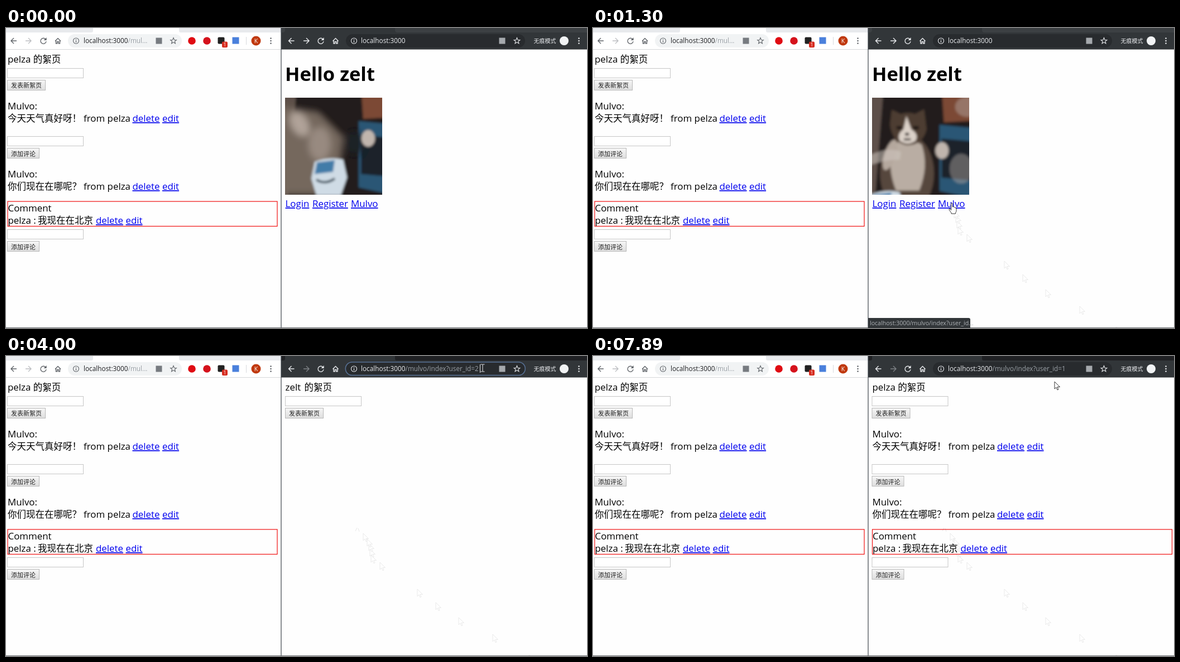
Recreate the animation shown at these times as an HTML page. Size 1041x538 px, loop 8 s.

```html
<!DOCTYPE html>
<html lang="zh-CN">
<head>
<meta charset="utf-8">
<title>Two browser windows</title>
<style>
html, body { margin: 0; width: 100%; height: 100%; overflow: hidden; background: #fff; }
svg { display: block; width: 100vw; height: 100vh; }
text { font: 16.9px "Open Sans", "Noto Sans CJK SC", "Noto Sans CJK", sans-serif; white-space: pre; }
.cjk { font-size: 16.5px; }
.btn { font-size: 11px; fill: #222; }
.link { fill: #00e; text-decoration: underline; text-decoration-thickness: 1px; }
.h1 { font-size: 34.5px; font-weight: 700; }
.url { font-size: 11.8px; fill: #9aa0a6; }
.host { fill: #e8eaed; }
.strong { font-weight: 600; }
.light { color: #5f6368; }
.dark { color: #e8eaed; }
.ico { fill: none; stroke: currentColor; stroke-width: 1.4; }
.field { fill: #fff; stroke: #c6c6c6; }
.button { fill: url(#face); stroke: #b8b8b8; }
.box { fill: none; stroke: #f01010; stroke-width: 1.2; }

/* .w parts are shown only inside their time window */
.w, .move, .photo * { animation: 8s step-end infinite; }
.w { visibility: hidden; }
@keyframes idle { 0% { visibility: visible } 20% { visibility: hidden } }
@keyframes home { 0% { visibility: visible } 23.125% { visibility: hidden } }
@keyframes gone { 23.125% { visibility: visible } }
@keyframes ready { 0% { visibility: visible } 20% { visibility: hidden } 24.125% { visibility: visible } }
@keyframes busy { 20% { visibility: visible } 24.125% { visibility: hidden } }
@keyframes status { 14.375% { visibility: visible } 25.875% { visibility: hidden } }
@keyframes blank { 23.125% { visibility: visible } 89.875% { visibility: hidden } }
@keyframes second { 23.125% { visibility: visible } 59.75% { visibility: hidden } }
@keyframes posts { 89.875% { visibility: visible } }
@keyframes ring { 36.5% { visibility: visible } 59.75% { visibility: hidden } }
@keyframes select { 36.5% { visibility: visible } 50% { visibility: hidden } }
@keyframes caret { 50% { visibility: visible } 56.875% { visibility: hidden } }
@keyframes longlist { 59.75% { visibility: visible } 63.625% { visibility: hidden } }
@keyframes shortlist { 63.625% { visibility: visible } 89.875% { visibility: hidden } }
@keyframes blink {
  63.625% { visibility: visible } 70.5% { visibility: hidden }
  76.25% { visibility: visible } 83.125% { visibility: hidden }
}
@keyframes trail1 { 10.375% { visibility: visible } }
@keyframes trail2 { 14% { visibility: visible } }
@keyframes trail3 { 27.6% { visibility: visible } }
@keyframes arrow {
  4.625% { visibility: visible } 14% { visibility: hidden }
  25.875% { visibility: visible } 32.6% { visibility: hidden }
  97.5% { visibility: visible }
}
@keyframes hand { 14% { visibility: visible } 25.875% { visibility: hidden } }
@keyframes beam { 32.6% { visibility: visible } 97.5% { visibility: hidden } }
@keyframes arrowMove {
  0%, 4.625% { transform: translate(937px, 535px) }
  5.6% { transform: translate(872px, 499px) }
  6.6% { transform: translate(811px, 469px) }
  7.5% { transform: translate(770px, 442px) }
  8.5% { transform: translate(737px, 418px) }
  9.4% { transform: translate(670px, 370px) }
  10.375% { transform: translate(654px, 357px) }
  11.5% { transform: translate(651px, 335px) }
  12.4% { transform: translate(648px, 328px) }
  13.25% { transform: translate(645px, 320px) }
  25.875% { transform: translate(640px, 318px) }
  26.75% { transform: translate(627px, 307px) }
  27.6% { transform: translate(640px, 285px) }
  28.4% { transform: translate(672px, 240px) }
  29.2% { transform: translate(715px, 180px) }
  30.1% { transform: translate(765px, 120px) }
  31% { transform: translate(815px, 70px) }
  31.8% { transform: translate(848px, 40px) }
  97.5% { transform: translate(837px, 40px) }
  98.625% { transform: translate(827px, 46px) }
}
@keyframes beamMove {
  0%, 32.6% { transform: translate(875px, 24px) }
  33.5% { transform: translate(862px, 22px) }
  34.375% { transform: translate(852.5px, 21px) }
  40.25% { transform: translate(854px, 21.5px) }
  63.625% { transform: translate(855px, 21.5px) }
}

/* photo: blurred turn, facing forward, standing back */
.photo * { animation-timing-function: steps(11); }
.photo .turn { animation-name: turn; }
.photo .cat { animation-name: cat; transform-origin: 555px 230px; }
.photo .reach { animation-name: reach; }
.photo .shelf { animation-name: shelf; }
.photo .kit { animation-name: kit; }
.photo .toy { animation-name: toy; }
.photo .paw { animation-name: paw; }
@keyframes turn { 0% { opacity: 1 } 11.5%, 100% { opacity: 0 } }
@keyframes cat {
  0% { opacity: 0; transform: translate(-16px, 12px) scale(1.18) }
  11.5% { opacity: 1; transform: translate(16px, 12px) scale(1.18) }
  21.1%, 100% { opacity: 1; transform: none }
}
@keyframes reach { 0% { opacity: 0 } 11.5% { opacity: 1 } 21.1%, 100% { opacity: 0 } }
@keyframes shelf { 0%, 11.5% { transform: translate(25px, -14px) } 21.1%, 100% { transform: none } }
@keyframes kit { 0%, 11.5% { opacity: 0 } 21.1%, 100% { opacity: 1 } }
@keyframes toy {
  0% { transform: none } 11.5% { transform: translate(-33px, 32px) }
  21.1%, 100% { transform: translate(-80px, 90px) }
}
@keyframes paw { 0%, 11.5% { transform: none } 21.1%, 100% { transform: translate(-52px, 48px) } }
</style>
</head>
<body>
<svg viewBox="0 0 1041 538" preserveAspectRatio="none">
<defs>
  <linearGradient id="face" x2="0" y2="1"><stop stop-color="#f6f6f6"/><stop offset="1" stop-color="#dedede"/></linearGradient>
  <filter id="soft"><feGaussianBlur stdDeviation="2"/></filter>
  <filter id="blur"><feGaussianBlur stdDeviation="6"/></filter>
  <filter id="shade" x="-10%" y="-10%" width="120%" height="130%"><feDropShadow dy="4" stdDeviation="4" flood-opacity=".4"/></filter>
  <clipPath id="frame"><path d="M500.3 125H674V299H500.3z"/></clipPath>

  <path id="back" class="ico" d="M5 0H-5M0-5L-5 0L0 5"/>
  <g id="reload"><path class="ico" d="M3.8-3A5 5 0 1 0 5 1"/><path fill="currentColor" d="M5.6-6V-1H.6z"/></g>
  <path id="stop" class="ico" d="M-4.5-4.5L4.5 4.5M4.5-4.5L-4.5 4.5"/>
  <path id="house" class="ico" d="M-5 .5L0-4.5L5 .5M-3.5-.5V4.8H-1.2V1.5H1.2V4.8H3.5V-.5"/>
  <path id="star" class="ico" style="stroke-width:1.1" d="M0-5.5L1.5-1.8L5.4-1.6L2.4 .9L3.4 4.7L0 2.6L-3.4 4.7L-2.4 .9L-5.4-1.6L-1.5-1.8z"/>
  <g id="info"><circle class="ico" style="stroke-width:1.1" r="5"/><path class="ico" style="stroke-width:1.2" d="M0-3V-1.6M0-.5V3"/></g>
  <g id="dots" fill="currentColor"><circle cy="-4.5" r="1.3"/><circle r="1.3"/><circle cy="4.5" r="1.3"/></g>
  <g id="globe"><circle r="5.5" fill="#c6c9cc"/><path d="M-5-1Q-1 0-2 2T0 5M1-5Q0-2 2-1T5 1" fill="none" stroke="#4a4d51" stroke-width="1.3"/></g>
  <path id="lens" class="ico" d="M1.5-1A3.2 3.2 0 1 1-4.9-1A3.2 3.2 0 1 1 1.5-1M.8 1.3L4.8 5.2"/>

  <path id="pointer" d="M0 0V13L3 10.2L5 14.8L7 14L5 9.5H9.5z" fill="#fff" stroke="#222" stroke-width=".9"/>
  <path id="finger" d="M-1.3 1Q-1.3-.5 0-.5T1.3 1V6.5L2.5 6Q4 6 4.2 7Q6 6.5 6.3 8Q8 8 8 9.5V13Q8 15 6.5 17V18.5H-1V17L-5 11.5Q-5.5 9.5-4 9.5L-1.3 12z" fill="#fff" stroke="#222" stroke-width=".9"/>

  <g id="compose">
    <rect class="field" x="2.5" y="72.5" width="136" height="17"/>
    <rect class="button" x="2.5" y="93.5" width="68" height="18"/>
    <text class="btn" x="9" y="107">发表新絮页</text>
  </g>
  <g id="reply">
    <rect class="field" x="2.5" y="194.5" width="136" height="17"/>
    <rect class="button" x="2.5" y="215.5" width="57" height="18"/>
    <text class="btn" x="9" y="229.5">添加评论</text>
  </g>
  <g id="byline">
    <text x="3" y="146">Mulvo:</text>
    <text x="139" y="168">from pelza</text>
    <text class="link" x="226.5" y="168">delete</text>
    <text class="link" x="280" y="168">edit</text>
  </g>
  <g id="feed">
    <text x="3" y="62">pelza <tspan class="cjk">的絮页</tspan></text>
    <use href="#compose"/>
    <use href="#byline"/>
    <text class="cjk" x="3" y="168">今天天气真好呀！</text>
    <use href="#reply"/>
    <use href="#byline" y="122"/>
    <text class="cjk" x="3" y="290">你们现在在哪呢？</text>
    <text x="3.5" y="329">Comment</text>
    <text x="3.5" y="351">pelza : <tspan class="cjk" x="57">我现在在北京</tspan></text>
    <text class="link" x="161" y="351">delete</text>
    <text class="link" x="214.5" y="351">edit</text>
    <use href="#reply" y="167"/>
  </g>
</defs>

<rect width="1041" height="538" fill="#fefefe"/>

<!-- left window -->
<g class="light">
  <path d="M0 0H492V38H0z" fill="#fff"/>
  <path d="M0 0H156V5Q156 8 153 8H0zM310 0H493V8H313Q310 8 310 5z" fill="#e8eaed"/>
  <path d="M0 38.5H493" stroke="#d6d8da"/>
  <use href="#back" x="14" y="23"/>
  <use href="#back" transform="translate(40 23) scale(-1 1)" color="#bdbfc2"/>
  <use href="#reload" x="67" y="23"/>
  <use href="#house" x="93" y="23"/>
  <rect x="111" y="11" width="204" height="24" rx="12" fill="#f1f3f4"/>
  <use href="#info" x="125.5" y="23"/>
  <text class="url" x="139" y="27"><tspan fill="#202124">localhost:3000</tspan>/mul...</text>
  <rect x="268.5" y="17.5" width="11" height="11" fill="#777b80"/>
  <use href="#star" x="300" y="23"/>
  <circle cx="333" cy="23" r="6.8" fill="#e00b12"/>
  <circle cx="360" cy="23" r="6.8" fill="#d5121c"/>
  <rect x="379.5" y="16.5" width="12" height="12" rx="2" fill="#222"/>
  <rect x="387" y="24.5" width="10" height="10.5" rx="2" fill="#d62d20"/>
  <text x="392" y="33" text-anchor="middle" fill="#fff" style="font-size:8.5px">1</text>
  <rect x="405.5" y="16.5" width="12" height="12" fill="#4a80dc"/>
  <path d="M430.5 16V30" stroke="#d8dadd"/>
  <circle cx="448" cy="23" r="8.5" fill="#c0390f"/>
  <text x="448" y="26.8" text-anchor="middle" fill="#fff" style="font-size:10.5px">K</text>
  <use href="#dots" x="474.5" y="23"/>
</g>
<use href="#feed"/>
<rect class="box" x="3" y="311" width="483" height="44.5"/>

<!-- right window: pages -->
<g class="w" style="animation-name:home">
  <text class="h1" x="500" y="95">Hello zelt</text>
  <g clip-path="url(#frame)"><g class="photo" filter="url(#soft)">
    <path d="M490 115H684V309H490z" fill="#211b1b"/>
    <path d="M490 115H520L505 309H490z" fill="#5d5049"/>
    <g class="shelf">
      <path d="M611 115H700V172L615 177z" fill="#7c4935"/>
      <path d="M607 181L700 190V320L607 300z" fill="#2b5675"/>
      <path d="M611 206L700 214V284L611 276z" fill="#1a222b"/>
      <g class="kit" fill="#b5aba5"><ellipse cx="657" cy="149" rx="22" ry="18"/><ellipse cx="646" cy="260" rx="21" ry="27"/></g>
    </g>
    <g class="turn" filter="url(#blur)">
      <path d="M490 140L560 150L605 195L600 240L560 300H490z" fill="#75675d"/>
      <ellipse cx="526" cy="172" rx="15" ry="24" fill="#b0a399" transform="rotate(-30 526 172)"/>
      <ellipse cx="562" cy="208" rx="20" ry="30" fill="#988a80"/>
      <ellipse cx="624" cy="206" rx="15" ry="20" fill="#1e2128"/>
    </g>
    <g class="cat">
      <ellipse cx="554" cy="252" rx="44" ry="64" fill="#56463c"/>
      <path d="M532 205Q554 190 578 205Q590 240 574 280H536Q520 240 532 205z" fill="#b9ada3"/>
      <ellipse cx="526" cy="222" rx="9" ry="26" fill="#b5a89e" transform="rotate(18 526 222)"/>
      <path d="M526 172L529 148L544 155Q556 151 567 155L582 147L586 180Q580 205 555 206Q530 203 526 172z" fill="#4d3c32"/>
      <path d="M553 158L561 180Q574 188 568 199Q555 208 542 199Q537 188 548 180z" fill="#dcd2c9"/>
      <path d="M537 175h9v5h-9zM564 175h9v5h-9zM551 186h6v4h-6zM549 195h11v3h-11z" fill="#1d1512"/>
    </g>
    <path class="reach" d="M496 228Q530 212 552 222L550 236Q525 236 496 246z" fill="#d0c7c0"/>
    <ellipse class="paw" cx="649" cy="198" rx="12" ry="15" fill="#c0b5ad"/>
    <g class="toy">
      <path d="M553 240Q578 230 604 236L611 268L600 300H556L547 270z" fill="#cfdbe5"/>
      <path d="M557 241L589 237L586 258L553 262z" fill="#437ba8"/>
      <path d="M556 272Q572 282 589 270" fill="none" stroke="#394b5a" stroke-width="4"/>
    </g>
  </g></g>
  <text class="link" x="500.5" y="321">Login</text>
  <text class="link" x="549" y="321">Register</text>
  <text class="link" x="618" y="321">Mulvo</text>
</g>
<g class="w" style="animation-name:blank">
  <text x="500.5" y="62">zelt <tspan class="cjk" x="534.5">的絮页</tspan></text>
  <use href="#compose" x="498"/>
</g>
<g class="w" style="animation-name:posts">
  <use href="#feed" x="497.5"/>
  <rect class="box" x="500.5" y="311" width="537" height="44.5"/>
</g>

<!-- faint marks left by the pointer -->
<g opacity=".1">
  <g class="w" style="animation-name:trail1">
    <use href="#pointer" x="937" y="535"/><use href="#pointer" x="872" y="499"/>
    <use href="#pointer" x="811" y="469"/><use href="#pointer" x="770" y="442"/>
    <use href="#pointer" x="737" y="418"/><use href="#pointer" x="670" y="370"/>
    <use href="#pointer" x="654" y="357"/>
  </g>
  <g class="w" style="animation-name:trail2">
    <use href="#pointer" x="652" y="346"/><use href="#pointer" x="650" y="336"/><use href="#pointer" x="647" y="328"/>
  </g>
  <g class="w" style="animation-name:trail3">
    <use href="#pointer" x="640" y="318"/><path d="M626 314L629 308M631 309L633 315" stroke="#222"/>
  </g>
</g>

<!-- right window: toolbar -->
<g class="dark">
  <path d="M493 0H1041V38.5H493z" fill="#323639"/>
  <path d="M493 0H500V5Q500 8 497 8H493zM697 0H1041V8H700Q697 8 697 5z" fill="#202124"/>
  <path class="w" style="animation-name:idle" d="M493 0H500V5Q500 8 497 8H493zM697 0H1041V8H700Q697 8 697 5z" fill="#3c4043"/>
  <use href="#back" x="511.5" y="23"/>
  <g class="w" style="animation-name:home"><use href="#back" transform="translate(538 23) scale(-1 1)"/></g>
  <g class="w" style="animation-name:gone" color="#7d8185"><use href="#back" transform="translate(538 23) scale(-1 1)"/></g>
  <g class="w" style="animation-name:ready"><use href="#reload" x="564" y="23"/></g>
  <g class="w" style="animation-name:busy"><use href="#stop" x="564" y="23"/></g>
  <use href="#house" x="590.5" y="23"/>
  <rect x="609" y="11" width="321" height="24" rx="12" fill="#282b2e"/>
  <rect class="w" style="animation-name:ring" x="608.3" y="11" width="322" height="23.5" rx="11.7" fill="none" stroke="#566f92" stroke-width="1.6"/>
  <rect class="w" style="animation-name:select" x="636" y="15" width="213" height="15" fill="#4b78b8"/>
  <use href="#info" x="623.5" y="23"/>
  <text class="url w" style="animation-name:home" x="636" y="27"><tspan class="host">localhost:3000</tspan></text>
  <text class="url w" style="animation-name:second" x="636" y="27"><tspan class="host">localhost:3000</tspan>/mulvo/index?user_id=2</text>
  <text class="url w" style="animation-name:posts" x="636" y="27"><tspan class="host">localhost:3000</tspan>/mulvo/index?user_id=1</text>
  <path class="w" style="animation-name:caret" d="M849.5 15V30" stroke="#e8eaed"/>
  <rect x="883.5" y="17.5" width="11" height="11" fill="#a5a9ad"/>
  <use href="#star" x="915.5" y="23"/>
  <text x="945.5" y="27" fill="#e8eaed" style="font-size:10px">无痕模式</text>
  <circle cx="1000" cy="23" r="8" fill="#f1f3f4"/>
  <use href="#dots" x="1026.5" y="23"/>
</g>

<!-- suggestion lists -->
<g class="w dark" style="animation-name:longlist">
  <rect x="603.5" y="8" width="332.5" height="214" rx="7" fill="#3a3d40" filter="url(#shade)"/>
  <path d="M603.5 38.5H936V68.5H603.5z" fill="#484b4f"/>
  <use href="#globe" x="623" y="23"/><use href="#lens" x="623" y="53"/>
  <use href="#globe" x="623" y="84"/><use href="#globe" x="623" y="115"/>
  <use href="#globe" x="623" y="145"/><use href="#globe" x="623" y="176"/><use href="#globe" x="623" y="206"/>
  <text class="url" x="645" y="27"><tspan class="host">localhost:3000</tspan>/mulvo/index?user_id=</text>
  <text class="url host" x="645" y="57">localhost:3000/mulvo/index?user_id=</text>
  <text class="url host" x="645" y="88">localhost:3000/mulvo/index?user_id=2</text>
  <text class="url host" x="645" y="119">localhost:3000/mulvo/index?user_id=1</text>
  <text class="url host" x="645" y="149">localhost:3000/mulvo/index</text>
  <text class="url host" x="645" y="180">localhost:3000/mulvo</text>
  <text class="url host" x="645" y="210">localhost:3000</text>
  <path d="M850.5 15V30" stroke="#e8eaed"/>
  <rect x="910" y="17.5" width="11" height="11" fill="#a5a9ad"/>
</g>
<g class="w dark" style="animation-name:shortlist">
  <rect x="603.5" y="8" width="332.5" height="90.5" rx="7" fill="#3a3d40" filter="url(#shade)"/>
  <path d="M603.5 38.5H936V68.5H603.5z" fill="#484b4f"/>
  <use href="#globe" x="623" y="23"/><use href="#globe" x="623" y="53"/><use href="#lens" x="623" y="83"/>
  <text class="url" x="645" y="27"><tspan class="host">localhost:3000</tspan>/mulvo/index?user_id=1</text>
  <text class="url strong" x="645" y="57"><tspan class="host">Mulvo</tspan> - <tspan x="695" fill="#8ab4f8">localhost:3000/mulvo/index?user_id=1</tspan></text>
  <text class="url host" x="645" y="88">localhost:3000/mulvo/index?user_id=1</text>
  <rect x="910" y="17.5" width="11" height="11" fill="#a5a9ad"/>
</g>
<path class="w" style="animation-name:blink" d="M857.8 15V30" stroke="#e8eaed"/>

<!-- window edges and status bubble -->
<path d="M493 0V538" stroke="#3b4248" stroke-width="1.2"/>
<path d="M0 537.5H1041" stroke="#686b6e"/>
<g class="w" style="animation-name:status">
  <path d="M493 520H673Q676 520 676 523V538H493z" fill="#323639"/>
  <text x="496" y="533" fill="#aeb2b6" style="font-size:10.6px">localhost:3000/mulvo/index?user_id...</text>
</g>

<!-- pointers -->
<g class="move" style="animation-name:arrowMove"><g class="w" style="animation-name:arrow"><use href="#pointer"/></g></g>
<g class="w" style="animation-name:hand"><use href="#finger" x="643" y="314.5"/></g>
<g class="move" style="animation-name:beamMove"><g class="w" style="animation-name:beam">
  <path d="M-3.5-6.5H-1Q0-6.5 0-5.5Q0-6.5 1-6.5H3.5M0-5.5V5.5M-3.5 6.5H-1Q0 6.5 0 5.5Q0 6.5 1 6.5H3.5" fill="none" stroke="#e4e6e8"/>
</g></g>
</svg>
</body>
</html>
```
